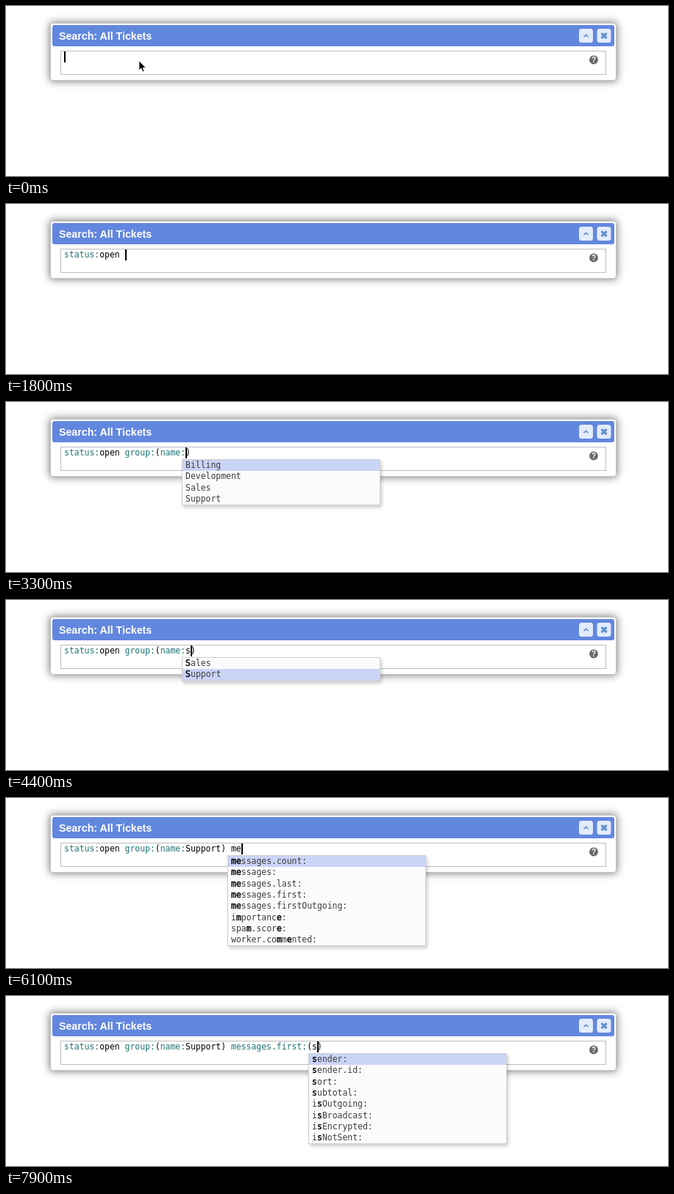
Write an HTML page that moves like this. It is 900 by 232 pixels and loops after 8 s.

```html
<!DOCTYPE html>
<html lang="en">
<head>
<meta charset="utf-8">
<title>Ticket search</title>
<style>
  html, body { margin: 0; width: 100%; height: 100%; overflow: hidden; background: #fff; }
  #stage { position: relative; width: 900px; height: 232px; overflow: hidden; }
  #stage div, #stage svg { position: absolute; box-sizing: border-box; }
  #dialog {
    left: 60px; top: 23px; width: 770px; height: 79px;
    border: 1px solid #c4c4c4; border-radius: 4px; background: #fff;
    box-shadow: 0 0 11px 1px rgba(0, 0, 0, .5);
  }
  #bar { left: 63px; top: 26px; width: 764px; height: 29px; border-radius: 3px; background: #6287de; }
  #title {
    left: 72px; top: 31px; line-height: 20px; color: #fff; white-space: pre;
    font: bold 14.2px/20px "Liberation Sans", Arial, sans-serif;
  }
  #field { left: 74px; top: 61px; width: 742px; height: 33px; border: 1px solid #bdbdbd; }
  #query, #popup { font: 11.43px "DejaVu Sans Mono", monospace; white-space: pre; }
  #query { left: 79px; top: 62px; line-height: 14.6px; color: #000; }
  #query b { font-weight: normal; color: #1c7474; }
  #caret { top: 62px; width: 2px; height: 15px; background: #000; }
  #popup {
    top: 78px; width: 270px; border: 1px solid #d0d0d0; background: #fbfbfb;
    box-shadow: 2px 3px 5px rgba(0, 0, 0, .2); color: #3c3c3c;
  }
  #popup div { left: 0; width: 100%; height: 15.3px; padding-left: 4px; line-height: 15.3px; }
  #popup .on { background: #cad4f6; }
  #popup b { font-weight: normal; color: #000; -webkit-text-stroke: .4px #000; }
  #art { left: 0; top: 0; }
</style>
</head>
<body>
<div id="stage">
  <div id="dialog"></div>
  <div id="bar"></div>
  <div id="title">Search: All Tickets</div>
  <div id="field"></div>
  <svg id="art" width="900" height="232">
    <g fill="#e3ebfb">
      <rect x="779" y="31" width="19" height="19" rx="3.5"/>
      <rect x="803.5" y="31" width="19" height="19" rx="3.5"/>
    </g>
    <path d="M785.5 42.3l3-3 3 3" fill="none" stroke="#5e86c4" stroke-width="1.6"/>
    <path d="M809.6 37.2l7 7m0-7l-7 7" stroke="#5f92cb" stroke-width="3.2"/>
    <circle cx="799" cy="73.5" r="5.9" fill="#696969"/>
    <text x="799" y="77" fill="#fff" text-anchor="middle"
      font-family="Liberation Sans, Arial, sans-serif" font-size="10" font-weight="bold">?</text>
  </svg>
  <div id="query"></div>
  <div id="caret"></div>
  <div id="popup"></div>
  <svg id="pointer" style="left:179px;top:73px" width="14" height="20">
    <path d="M1.8 1.6v13.2l3-2.8 2.1 5 2.2-.9-2.1-4.8h4.2z" fill="#000" stroke="#fff" stroke-width="1"/>
  </svg>
</div>
<script>
const LOOP = 8000, LEFT = 79, CHAR = 6.88, ROW = 15.3, MAX_ROWS = 8;

const words = s => s.split(' ');
const lists = {
  ticket: words('status: bucket: closed: created: group: group.id: id: messages.count: messages: ' +
    'messages.last: messages.first: messages.firstOutgoing: importance: spam.score: ' +
    'worker.commented: sort: spam.training: subject: subtotal:'),
  status: words('open waiting closed deleted [o,w] ![d]'),
  group: words('created: default: id: manager: member: name: private: updated:'),
  name: words('Billing Development Sales Support'),
  message: words('content: created: id: isOutgoing: isBroadcast: isEncrypted: isNotSent: ' +
    'responseTime: sender: sender.id: sort: subtotal:')
};

const G = 'status:open group:(', N = G + 'name:', S = N + 'Support) ', M = S + 'messages.first:(';

// time, text before caret, text after caret, popup list, typed prefix length, selected row
const steps = [
  [0, '', ''],
  [300, 's', '', 'ticket', 1, 0],
  [500, 'st', '', 'ticket', 2, 0],
  [800, 'status:', ''],
  [900, 'status:', '', 'status', 0, 0],
  [1400, 'status:open', ''],
  [1800, 'status:open ', ''],
  [1900, 'status:open ', '', 'ticket', 0, 0],
  [2100, 'status:open g', '', 'ticket', 1, 0],
  [2300, 'status:open gr', '', 'ticket', 2, 0],
  [2500, G, ')'],
  [2600, G, ')', 'group', 0, 0],
  [3100, G + 'n', ')', 'group', 1, 0],
  [3200, N, ')'],
  [3300, N, ')', 'name', 0, 0],
  [3800, N + 's', ')', 'name', 1, 0],
  [4400, N + 's', ')', 'name', 1, 1],
  [4800, N + 'Support', ')'],
  [4900, N + 'Support)', ''],
  [5300, S, ''],
  [5400, S, '', 'ticket', 0, 0],
  [5900, S + 'm', '', 'ticket', 1, 0],
  [6100, S + 'me', '', 'ticket', 2, 0],
  [6400, S + 'mes', '', 'ticket', 3, 0],
  [6800, S + 'mes', '', 'ticket', 3, 1],
  [6900, S + 'mes', '', 'ticket', 3, 2],
  [7000, S + 'mes', '', 'ticket', 3, 3],
  [7300, M, ')', 'message', 0, 0],
  [7900, M + 's', ')', 'message', 1, 0]
];

const el = id => document.getElementById(id);
const query = el('query'), caret = el('caret'), popup = el('popup'), pointer = el('pointer');

// Marks the letters of prefix found in order; null when some are missing.
function mark(word, prefix) {
  let i = 0;
  const html = [...word].map(c =>
    i < prefix.length && c.toLowerCase() === prefix[i] ? (i++, `<b>${c}</b>`) : c).join('');
  return i === prefix.length ? html : null;
}

function matches(list, prefix) {
  const starts = w => w.toLowerCase().startsWith(prefix);
  return [...list.filter(starts), ...list.filter(w => !starts(w))]
    .map(w => mark(w, prefix)).filter(Boolean).slice(0, MAX_ROWS);
}

function show([time, before, after, list, typed, selected]) {
  query.innerHTML = (before + after).replace(/[\w.]+:/g, '<b>$&</b>');
  caret.style.left = LEFT + before.length * CHAR + 'px';
  pointer.style.display = time === 0 ? '' : 'none';
  popup.style.display = list ? '' : 'none';
  if (!list) return;
  const start = before.length - typed;
  const rows = matches(lists[list], before.slice(start));
  popup.style.left = LEFT + start * CHAR - 5 + 'px';
  popup.style.height = rows.length * ROW + 2 + 'px';
  popup.innerHTML = rows.map((html, i) =>
    `<div class="${i === selected ? 'on' : ''}" style="top:${i * ROW}px">${html}</div>`).join('');
}

let current;
const origin = performance.now();
function tick() {
  const t = (performance.now() - origin) % LOOP;
  const step = steps.filter(s => s[0] <= t).pop();
  if (step !== current) show(current = step);
  requestAnimationFrame(tick);
}
tick();
</script>
</body>
</html>
```
